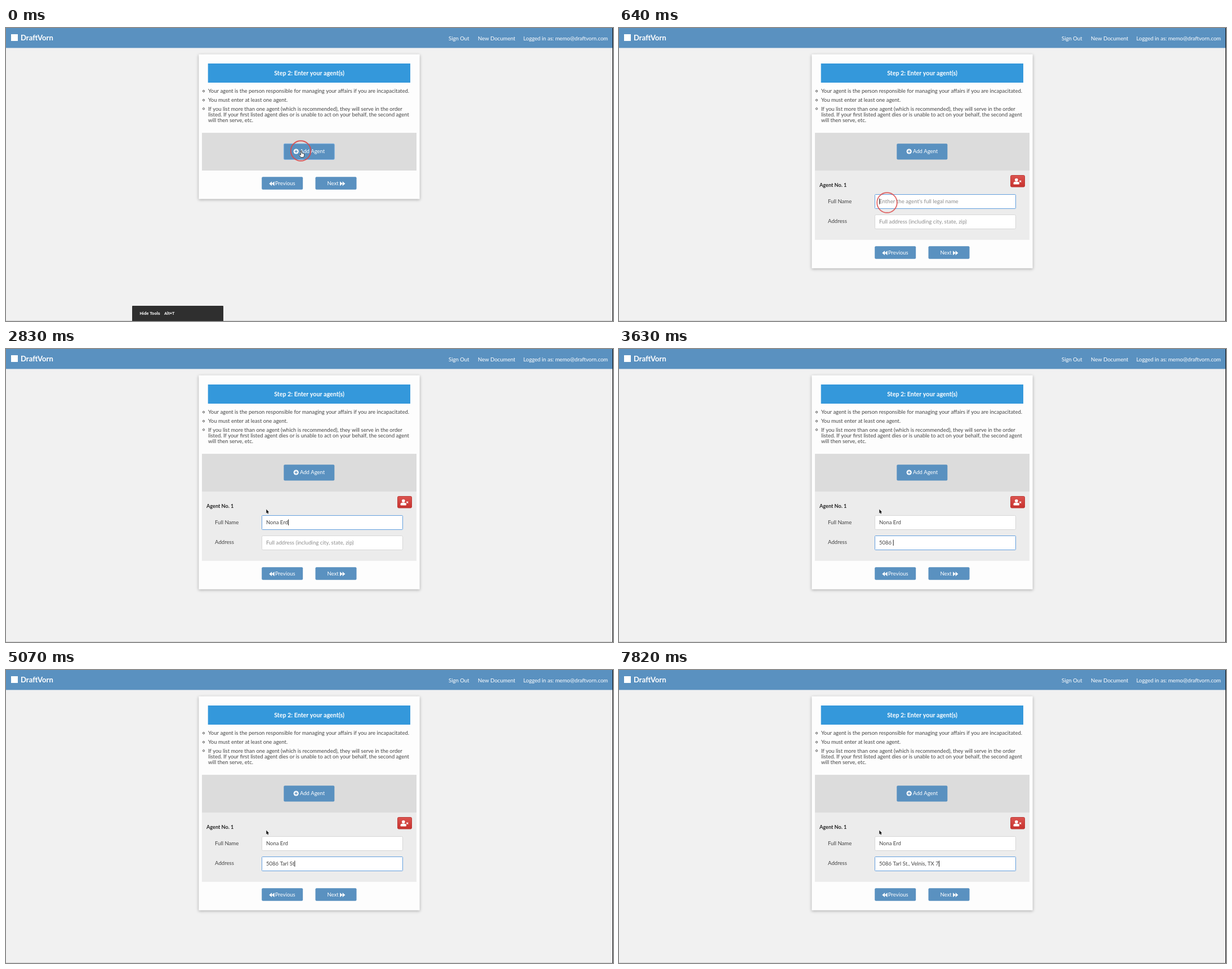
Animation of 1078x520 px, one loop 8000 ms. Source, as an HTML page with a canvas:

```html
<!DOCTYPE html>
<html lang="en">
<head>
<meta charset="utf-8">
<title>Enter your agents</title>
<style>
  html, body { margin: 0; width: 100%; height: 100%; overflow: hidden; background: #f1f1f1; }
  canvas { display: block; }
</style>
</head>
<body>
<canvas id="stage" width="1078" height="520"></canvas>
<script>
const ctx = document.getElementById('stage').getContext('2d');
const LOOP = 8000;
const FACE = 'Lato, "Open Sans", sans-serif';
const BLUE = '#5a91c0', INK = '#444', HINT = '#8d8d8d';

const NAME = 'Nona Erd';
const ADDRESS = '5086 Tarl St., Velnis, TX 7';

// [time in ms, characters typed]
const nameKeys = [[1330, 1], [1520, 2], [1720, 4], [1910, 5], [2400, 7], [2700, 8]];
const addressKeys = [
  [2960, 1], [3320, 2], [3470, 3], [3630, 5], [3810, 6], [4030, 7], [4250, 8],
  [4410, 9], [4790, 11], [5070, 12], [5280, 13], [5770, 15], [5950, 16], [6140, 18],
  [6320, 20], [6550, 21], [6680, 22], [7090, 24], [7300, 25], [7580, 26], [7820, 27]
];

const clamp = v => Math.max(0, Math.min(1, v));
const ramp = (t, from, to) => clamp((t - from) / (to - from));
const ease = p => p * p * (3 - 2 * p);
const mix = (a, b, p) => a + (b - a) * p;

function typed(text, keys, t) {
  let n = 0;
  for (const [at, count] of keys) if (t >= at) n = count;
  return text.slice(0, n);
}

function rect(x, y, w, h, fill) {
  ctx.fillStyle = fill;
  ctx.fillRect(x, y, w, h);
}

function box(x, y, w, h, r, fill, line) {
  ctx.beginPath();
  ctx.roundRect(x, y, w, h, r);
  ctx.fillStyle = fill;
  ctx.fill();
  if (line) {
    ctx.strokeStyle = line;
    ctx.lineWidth = 1;
    ctx.stroke();
  }
}

function disc(x, y, r, fill) {
  ctx.beginPath();
  ctx.arc(x, y, r, 0, 7);
  ctx.fillStyle = fill;
  ctx.fill();
}

function shape(points, fill, line) {
  ctx.beginPath();
  points.forEach(([x, y]) => ctx.lineTo(x, y));
  ctx.closePath();
  ctx.fillStyle = fill;
  ctx.fill();
  if (line) {
    ctx.strokeStyle = line;
    ctx.lineWidth = 0.9;
    ctx.stroke();
  }
}

function text(str, x, y, { size = 9.47, color = INK, weight = 400, align = 'left', face = FACE } = {}) {
  ctx.font = `${weight} ${size}px ${face}`;
  ctx.textAlign = align;
  ctx.fillStyle = color;
  ctx.fillText(str, x, y);
}

function header() {
  rect(0, 0, 1078, 35.4, BLUE);
  rect(9, 11, 12, 12, '#fff');
  const link = { size: 9.6, color: '#fff' };
  text('DraftVorn', 26, 22, { size: 13.1, weight: 700, color: '#fff' });
  text('Sign Out', 786, 22, link);
  text('New Document', 838, 22, link);
  text('Logged in as: memo@draftvorn.com', 1069, 22, { ...link, align: 'right' });
}

function card(bottom) {
  ctx.save();
  ctx.shadowColor = 'rgba(0,0,0,.28)';
  ctx.shadowBlur = 5;
  ctx.shadowOffsetY = 1.5;
  rect(342.3, 46.7, 392.4, bottom - 46.7, '#fdfdfd');
  ctx.restore();

  rect(358.7, 63, 359.3, 34, '#3498db');
  text('Step 2: Enter your agent(s)', 538.5, 83.5,
    { size: 10.7, weight: 700, color: '#fff', align: 'center' });

  const lines = [
    ['Your agent is the person responsible for managing your affairs if you are incapacitated.', 115],
    ['You must enter at least one agent.', 131],
    ['If you list more than one agent (which is recommended), they will serve in the order', 146.5],
    ['listed. If your first listed agent dies or is unable to act on your behalf, the second agent', 157],
    ['will then serve, etc.', 167]
  ];
  for (const [str, y] of lines) text(str, 359, y);
  ctx.strokeStyle = '#444';
  ctx.lineWidth = 0.9;
  for (const y of [112, 128, 143.3]) {
    ctx.beginPath();
    ctx.arc(351, y, 1.6, 0, 7);
    ctx.stroke();
  }
}

function addButton(focused) {
  rect(348, 186, 381, 67, '#dcdcdc');
  box(493.3, 205.3, 90, 28.2, 2, BLUE, focused && '#82b4e4');
  disc(515.2, 219, 4.6, '#fff');
  rect(512.6, 218.3, 5.2, 1.4, BLUE);
  rect(514.5, 216.4, 1.4, 5.2, BLUE);
  text('Add Agent', 522, 222, { color: '#fff' });
}

// Two stacked arrowheads; dir is 1 for forward, -1 for back
function arrows(x, y, dir) {
  for (const dx of [0, 4.6 * dir]) {
    shape([[x + dx, y - 4], [x + dx + 4.8 * dir, y], [x + dx, y + 4]], '#fff');
  }
}

function navButtons(shift) {
  const y = 264.2 + shift;
  box(454.2, y, 73, 22.6, 2, BLUE);
  arrows(476.7, y + 12, -1);
  text('Previous', 478, y + 14.8, { color: '#fff' });
  box(549.5, y, 73, 22.6, 2, BLUE);
  text('Next', 570.5, y + 14.8, { color: '#fff' });
  arrows(593, y + 12, 1);
}

function field(y, value, hint, focused) {
  box(454.5, y, 250, 25, focused ? 1 : 2, '#fff', focused ? '#639fde' : '#d6d6d6');
  const base = y + 15;
  if (value) text(value, 462, base);
  else text(hint, 462, base, { size: 9.7, color: HINT });
  if (focused) {
    const x = 462.3 + (value ? ctx.measureText(value).width : 0);
    rect(x, y + 7, 1, 10.5, '#222');
  }
}

function removeButton() {
  const g = ctx.createLinearGradient(0, 261, 0, 282);
  g.addColorStop(0, '#dc5551');
  g.addColorStop(1, '#c7322e');
  box(695.5, 261.5, 25, 20.5, 2, g, '#bb3a36');
  disc(705.8, 269.6, 2.8, '#fff');
  box(700.5, 272.8, 10.4, 4.8, [3, 3, 1, 1], '#fff');
  ctx.strokeStyle = '#fff';
  ctx.lineWidth = 1.2;
  ctx.beginPath();
  ctx.moveTo(711.2, 270.6);
  ctx.lineTo(714.2, 273.6);
  ctx.moveTo(714.2, 270.6);
  ctx.lineTo(711.2, 273.6);
  ctx.stroke();
}

function agentForm(height, t) {
  ctx.save();
  ctx.beginPath();
  ctx.rect(348, 253, 381, height);
  ctx.clip();
  rect(348, 253, 381, 123, '#ececec');
  text('Agent No. 1', 356, 282, { size: 9.1, weight: 700, color: '#222' });
  removeButton();
  text('Full Name', 371, 310.5, { size: 9.6 });
  text('Address', 371, 346, { size: 9.6 });
  const inName = t >= 500 && t < 2960;
  field(295.5, typed(NAME, nameKeys, t), "Enther the agent's full legal name", inName);
  field(331.5, typed(ADDRESS, addressKeys, t), 'Full address (including city, state, zip)', t >= 2960);
  ctx.restore();
}

function toolHint(alpha) {
  if (!alpha) return;
  ctx.save();
  ctx.globalAlpha = alpha;
  box(224, 493, 162, 30, 1, '#2f2f2f');
  const style = { size: 7.6, weight: 700, color: '#f4f4f4', face: 'Roboto, Arial, sans-serif' };
  text('Hide Tools', 237.5, 509, style);
  text('Alt+T', 281, 509, style);
  ctx.restore();
}

function ring(x, y, alpha) {
  if (!alpha) return;
  ctx.beginPath();
  ctx.arc(x, y, 17.8, 0, 7);
  ctx.strokeStyle = `rgba(221,72,72,${alpha})`;
  ctx.lineWidth = 1.9;
  ctx.stroke();
}

function hand(x, y) {
  shape([
    [x, y], [x + 1.6, y], [x + 1.8, y + 4], [x + 6, y + 5], [x + 6.4, y + 8],
    [x + 5, y + 11.5], [x, y + 11.5], [x - 3, y + 7.2], [x - 2, y + 6.2], [x, y + 7.5]
  ], '#fff', '#333');
}

function pointer(x, y) {
  shape([
    [x, y], [x, y + 7], [x + 1.5, y + 5.7], [x + 2.6, y + 8],
    [x + 3.8, y + 7.4], [x + 2.8, y + 5.2], [x + 4.7, y + 5]
  ], '#161616');
}

function mouse(t) {
  const p = ease(ramp(t, 100, 500));
  const x = mix(523.5, 476, p), y = mix(218, 310, p);
  if (t < 500) ring(x, y, 0.9 * (1 - ramp(t, 100, 300)));
  else ring(x, y, 0.8 * (1 - ramp(t, 680, 930)));

  if (t < 230) hand(x, y);
  else if (t < 500) pointer(x, y);
  else if (t >= 2700) pointer(462.3, 284.5);
}

function draw(t) {
  const open = 123 * ease(ramp(t, 100, 480));
  rect(0, 0, 1078, 520, '#f1f1f1');
  header();
  card(303.5 + open);
  addButton(t < 230);
  if (open) agentForm(open, t);
  navButtons(open);
  rect(0, 519, 1078, 1, '#d4d4d4');
  toolHint(1 - ramp(t, 100, 500));
  rect(1077, 0, 1, 520, '#0c0d0e');
  mouse(t);
}

const start = performance.now();
function tick() {
  draw((performance.now() - start) % LOOP);
  requestAnimationFrame(tick);
}
tick();
</script>
</body>
</html>
```
